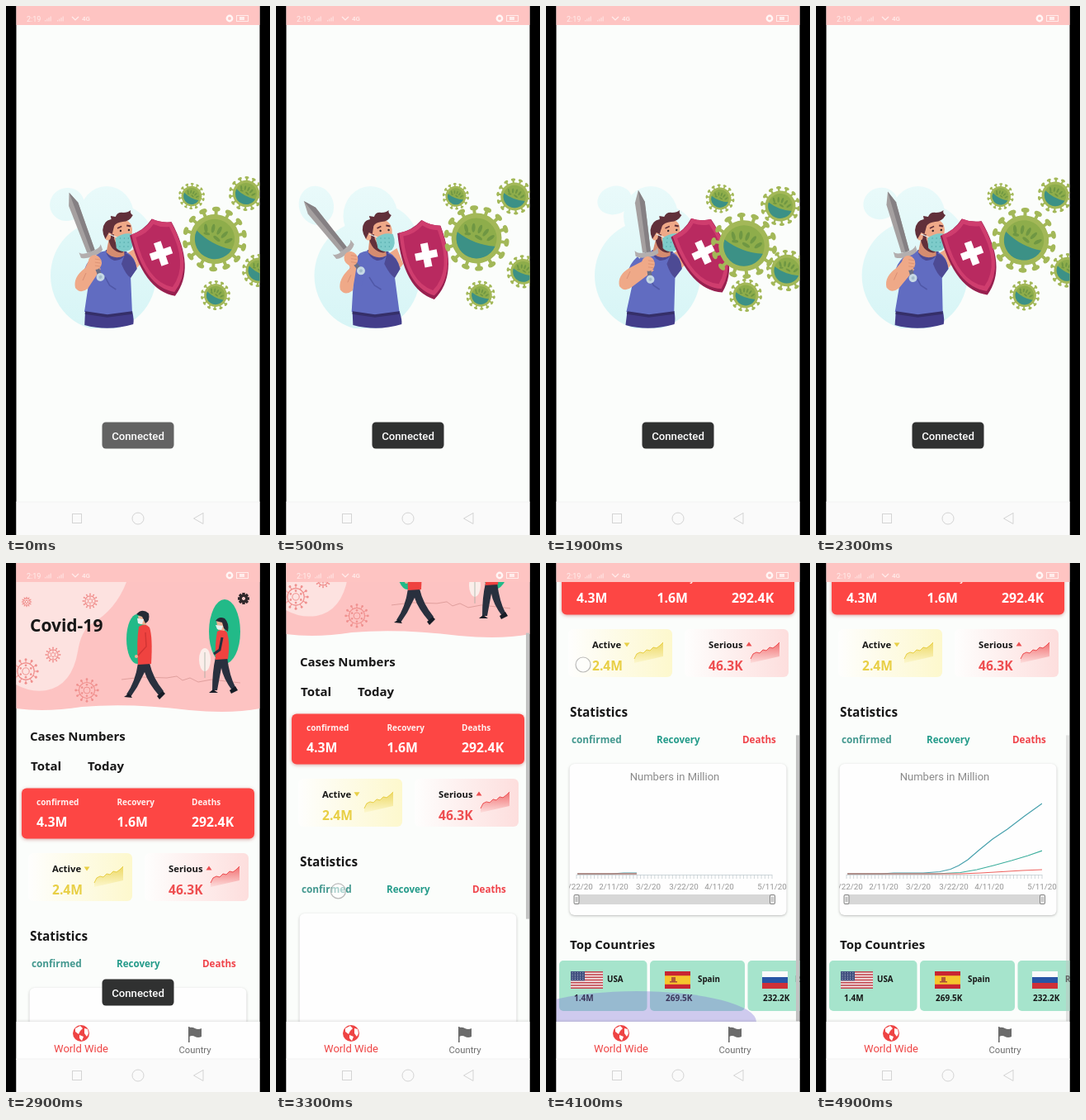
Write an HTML page with a canvas that moves like this. It is 320 px wide and 640 px high and loops after 5 s.

```html
<!DOCTYPE html>
<html lang="en">
<head>
<meta charset="utf-8">
<title>Health app</title>
<style>
html, body { margin: 0; width: 100%; height: 100%; overflow: hidden; background: #000; }
canvas { display: block; width: 320px; height: 640px; }
</style>
</head>
<body>
<canvas id="stage"></canvas>
<script>
const canvas = document.getElementById('stage');
const c = canvas.getContext('2d');
const dpr = window.devicePixelRatio || 1;
canvas.width = 320 * dpr;
canvas.height = 640 * dpr;

const LOOP = 5000, HOME_AT = 2400, MAX_SCROLL = 271;
const HELD = [3, 9, 15, 22, 28, 34, 40, 46];
const SANS = '"Noto Sans", "Open Sans", sans-serif', ROBOTO = 'Roboto, sans-serif';
const RED = '#fd4644', TEAL = '#249b8a', INK = '#171717';
const SKIN = '#efa988', HAIR = '#61303a', SHIRT = '#616cc1', SHIRT_DARK = '#4d4a94', VIRUS = '#a3b858';
const clamp = (v, a = 0, b = 1) => Math.min(b, Math.max(a, v));
const ramp = (t, a, b) => clamp((t - a) / (b - a));
const rad = deg => deg * Math.PI / 180;

// ---- drawing helpers ----
function text(s, x, y, size, color, { weight = 700, font = SANS, align = 'left' } = {}) {
  c.font = `${weight} ${size}px ${font}`;
  c.textAlign = align;
  c.fillStyle = color;
  c.fillText(s, x, y);
}
function rect(x, y, w, h, color) {
  c.fillStyle = color;
  c.fillRect(x, y, w, h);
}
function round(x, y, w, h, r, color) {
  c.beginPath();
  c.roundRect(x, y, w, h, r);
  c.fillStyle = color;
  c.fill();
}
function oval(x, y, rx, ry, color, rot = 0) {
  c.beginPath();
  c.ellipse(x, y, rx, ry, rot, 0, 7);
  c.fillStyle = color;
  c.fill();
}
const dot = (x, y, r, color) => oval(x, y, r, r, color);
function ring(x, y, r, color, w = 1) {
  c.beginPath();
  c.arc(x, y, r, 0, 7);
  c.strokeStyle = color;
  c.lineWidth = w;
  c.stroke();
}
function trace(pts) {
  c.beginPath();
  for (let i = 0; i < pts.length; i += 2) c.lineTo(pts[i], pts[i + 1]);
}
function poly(pts, color) {
  trace(pts);
  c.fillStyle = color;
  c.fill();
}
function line(pts, color, w = 1) {
  trace(pts);
  c.strokeStyle = color;
  c.lineWidth = w;
  c.stroke();
}
function shape(d, color) {
  c.fillStyle = color;
  c.fill(new Path2D(d));
}
function group(x, y, rot, draw) {
  c.save();
  c.translate(x, y);
  c.rotate(rot);
  draw();
  c.restore();
}
function shadowed(blur, dy, color, draw) {
  c.save();
  c.shadowColor = color;
  c.shadowBlur = blur * dpr;
  c.shadowOffsetY = dy * dpr;
  draw();
  c.restore();
}

// ---- splash ----
// Periodic sway through three poses (0, 1100 and 1900 ms of a 2400 ms cycle).
const NODES = [0, 1100, 1900].map(t => t * Math.PI / 2400);
function swayer(t) {
  const a = t * Math.PI / 2400;
  const w = NODES.map((n, i) => NODES.reduce((p, m, j) =>
    j === i ? p : p * Math.sin(a - m) / Math.sin(n - m), 1));
  return (p, q, r) => p * w[0] + q * w[1] + r * w[2];
}

function virus(x, y, r, turn) {
  group(x, y, turn, () => {
    for (let i = 0; i < 14; i++) {
      group(0, 0, (i + .5) * Math.PI / 7, () => {
        rect(r * .7, -r * .05, r * .22, r * .1, VIRUS);
        oval(r * .93, 0, r * .075, r * .125, VIRUS);
      });
    }
    dot(0, 0, r * .77, VIRUS);
    dot(0, 0, r * .62, '#8ead4b');
    c.beginPath();
    c.arc(0, 0, r * .62, .05, Math.PI - .05);
    c.quadraticCurveTo(0, r * .22, r * .62, r * .03);
    c.fillStyle = '#3c9186';
    c.fill();
    for (let i = -2; i <= 2; i++)
      oval(i * r * .2, -r * (.3 - .035 * i * i), r * .055, r * .14, '#6f9743', i * .3);
    oval(r * .05, -r * .04, r * .13, r * .05, '#6f9743', .2);
    oval(-r * .3, -r * .03, r * .1, r * .045, '#6f9743', -.3);
  });
}

function backdrop(s) {
  const x = s(118, 113, 123);
  const tint = c.createLinearGradient(0, 218, 0, 390);
  tint.addColorStop(0, '#e9fafa');
  tint.addColorStop(1, '#d7f5f6');
  c.save();
  c.beginPath();
  c.rect(12, 200, 296, 190);
  c.clip();
  oval(x, 326, 64, 66, tint);
  oval(x + 4, 254, 33, 36, tint);
  oval(x + 15, 290, 48, 50, tint);
  oval(s(74, 48, 83), s(240, 236, 235), 21, s(20, 22, 17), tint, -.3);
  c.restore();
}

function head() {
  shape('M118 284 L137 290 L138 302 Q126 308 116 298Z', '#d58c70');
  shape('M114 268 Q118 258 131 258 Q144 258 146 270 L146 287 Q139 298 128 294 Q117 288 114 268Z', SKIN);
  shape('M117 277 L124 276 Q124 288 137 298 Q130 300 123 293 Q118 287 117 277Z', HAIR);
  oval(117, 279, 3.5, 4.5, SKIN);
  shape('M114 282 Q107 270 113 262 Q115 259 120 258 L119 254 L125 255 Q127 249 134 250 Q140 250 143 247 Q142 251 146 253 Q142 261 134 261 Q126 262 124 266 L122 276 L118 274Z', HAIR);
  line([128, 269, 133, 266.5], HAIR, 1.8);
  line([139, 265.5, 144, 266.5], HAIR, 1.8);
  dot(132, 272, 1.2, '#33242a');
  dot(142, 271, 1.2, '#33242a');
  line([118, 276, 128, 280], '#e6f2f2', 1.3);
  shape('M126 281 Q136 273 147 276 Q151 288 145 295 Q135 300 128 293Z', '#7dcbca');
  for (let i = 0; i < 9; i++)
    dot(132 + i % 3 * 5, 281 + Math.floor(i / 3) * 5, .8, '#53a9aa');
}

function fighter(s) {
  const lean = s(.05, 0, .12), shift = s(1, 0, 2);
  c.save();
  c.transform(1, 0, -lean, 1, shift + 390 * lean, 0);
  shape('M94 369 L151 369 Q154 380 153 385 Q123 394 94 386Z', '#433d8a');
  shape('M137 302 L151 293 L158 312 L148 324Z', SKIN);
  shape('M106 299 Q122 292 141 298 Q151 303 154 318 L147 328 L151 371 Q122 378 93 370 L96 340 Q95 310 106 299Z', SHIRT);
  shape('M139 299 Q151 303 154 318 L147 329 Q141 325 135 312Z', SHIRT_DARK);
  shape('M115 295 L141 297 Q136 309 126 308 Q117 305 115 295Z', SHIRT_DARK);
  line([94, 371, 121, 375, 151, 371], '#352f69', 3.5);
  line([116, 328, 122, 338, 130, 343], '#5058a8', 1.5);
  head();
  c.restore();
}

function sword(s) {
  const x = s(103, 95, 122), y = s(297, 295, 298), turn = rad(s(-20.4, -33, -7.7));
  const hx = x - Math.sin(turn) * 14, hy = y + Math.cos(turn) * 14;
  const ex = s(87, 84, 92), ey = s(338, 339, 336);
  const sx = s(103, 100, 109);
  shape(`M${sx + 2} 303 Q${ex + 8} 313 ${ex + 7} 324 L${sx + 7} 340 L${sx + 14} 318Z`, SHIRT);
  shape(`M${ex + 9} 317 Q${ex - 6} ${ey - 10} ${ex - 3} ${ey + 3} Q${ex + 3} ${ey + 11} ${ex + 12} ${ey + 4}`
    + ` L${hx + 7} ${hy + 8} L${hx - 7} ${hy - 3}Z`, SKIN);
  line([ex + 10, ey - 15, ex + 6, ey - 6], '#d98f74', 1);
  group(x, y, turn, () => {
    poly([0, -76, -6, -61, -5, 0, 5, 0, 6, -61], '#a5a0a0');
    poly([0, -76, 0, 0, 5, 0, 6, -61], '#858083');
    rect(-2.5, 0, 5, 30, '#6b6f86');
    shape('M-14 -4 Q-11 1 0 0 Q11 1 14 -4 L14 3 Q8 7 0 6 Q-8 7 -14 3Z', '#b3aeae');
    dot(0, 33, 5, '#c6d9e5');
    dot(0, 33, 2, '#a3bccc');
  });
  oval(hx, hy, 8, 9, SKIN, turn);
  for (let i = 0; i < 3; i++)
    line([hx, hy - 4 + i * 4, hx + 7, hy - 3 + i * 4], '#d88e70', .8);
}

function shield(s) {
  group(s(187, 182, 191), s(304, 305, 302), rad(s(-21, -17, -27)), () => {
    const outline = 'M-25 -38 Q-7 -37 7 -47 Q16 -38 28 -35 Q36 28 0 50 Q-34 30 -25 -38Z';
    shape(outline, '#98204f');
    c.save();
    c.translate(1, -2);
    c.scale(.95, .95);
    shape(outline, '#cf3d6e');
    c.scale(.84, .86);
    shape(outline, '#b92a60');
    c.restore();
  });
  group(s(188, 182.5, 190.5), s(299.5, 300.5, 298), rad(s(-19, -15, -25)), () => {
    rect(-4.5, -14.5, 9, 29, '#fff');
    rect(-13.5, -4.5, 27, 9, '#fff');
  });
}

function splash(t) {
  const s = swayer(t);
  backdrop(s);
  fighter(s);
  sword(s);
  shield(s);
  const turn = s(.5, .14, .36);
  virus(s(225, 198, 211), s(230, 234, 233), s(16, 18, 17.5), turn);
  virus(s(291, 280, 284), s(227, 250, 242), s(21, 26, 24), turn);
  virus(s(306, 280, 292), s(320, 322, 320), s(20, 26, 25), turn);
  virus(s(253, 223, 240), s(282, 290, 290), s(39, 41, 40), turn);
  virus(s(254, 231, 242), s(350, 350, 350), s(18, 20, 20), turn);
}

// ---- home ----
function germ(x, y, r) {
  const color = '#f0908e';
  ring(x, y, r * .68, color, 1.2);
  ring(x, y, r * .28, color, 1);
  for (let i = 0; i < 12; i++) group(x, y, i * Math.PI / 6, () => {
    line([r * .68, 0, r * .95, 0], color, 1);
    dot(r * .95, 0, r * .1, color);
    if (i % 2) dot(r * .48, 0, r * .09, color);
  });
}

function walkers() {
  line([140, 141, 165, 138, 195, 139, 207, 137, 214, 142, 223, 139, 233, 144, 249, 141, 284, 145], '#d99694', .8);
  oval(159, 92, 13, 30, '#22ba88');
  oval(265, 83, 19, 39, '#22ba88');
  oval(241, 117, 7, 14, '#fbeeea');
  line([241, 108, 241, 139], '#9aa69c', .7);
  // left walker
  shape('M160 121 L174 121 Q178 139 191 155 L186 161 Q172 145 168 132 L159 150 L151 162 L146 159 Q157 143 160 121Z', '#29303e');
  shape('M143 162 L149 158 L153 163Z M183 161 L190 155 L193 158 L186 165Z', '#171c26');
  shape('M161 77 Q169 72 174 78 Q178 90 176 122 L160 123 Q158 95 161 77Z', '#ef4340');
  line([169, 84, 170, 101, 160, 112], '#d23434', 1.5);
  dot(158, 113, 2, '#efb193');
  shape('M160 64 L170 65 L170 75 L162 74Z', '#efb193');
  shape('M158 62 Q165 54 173 61 Q175 70 169 73 L165 65Z', '#252b36');
  shape('M159 67 L167 68 L165 74 L160 73Z', '#e8f1f1');
  // right walker
  shape('M254 114 L268 114 Q271 137 278 150 L274 154 Q263 139 261 127 L256 154 L250 154 Q250 131 254 114Z', '#29303e');
  shape('M246 157 L251 153 L257 157Z M271 154 L278 149 L281 154 L273 158Z', '#171c26');
  shape('M256 83 Q263 78 268 84 Q272 98 269 116 L254 117 Q253 98 256 83Z', '#ef4340');
  line([262, 90, 259, 105, 252, 110], '#29303e', 3);
  shape('M255 70 L264 70 L265 82 L257 81Z', '#efb193');
  shape('M254 70 Q258 64 265 67 Q271 73 269 83 L264 79 L262 72Z', '#252b36');
  shape('M254 75 L263 76 L261 81 L256 80Z', '#e8f1f1');
}

function header() {
  shape('M12 0 H308 V176 Q272 183 222 178 Q150 169 92 174 Q48 181 12 176Z', '#fdc3c2');
  shape('M12 23 H146 Q133 57 103 74 Q91 82 87 107 Q80 148 49 154 Q30 157 12 147Z', '#fde2e0');
  germ(25, 47, 6);
  germ(102, 46, 9);
  germ(57, 111, 9);
  germ(24, 131, 15);
  germ(98, 154, 14);
  walkers();
  text('Covid-19', 29, 83, 21, INK);
  for (let i = 0; i < 8; i++)
    group(288, 43, i * Math.PI / 4, () => rect(-1.7, -7, 3.4, 5, '#30282b'));
  ring(288, 43, 3.8, '#30282b', 2.8);
}

function trendCard(x, name, value, color, tint, up) {
  const g = c.createLinearGradient(x, 0, x + 126, 0);
  g.addColorStop(0, '#fefefd');
  g.addColorStop(1, tint);
  round(x, 351, 126, 58, 6, g);
  text(name, x + 29, 374, 11.3, INK);
  text(value, x + 29, 401, 15.6, color);
  const tx = up ? x + 78 : x + 71, d = up ? -3 : 3;
  poly([tx - 3.5, 369.5 - d * .7, tx + 3.5, 369.5 - d * .7, tx, 369.5 + d], color);
  const pts = [0, 387, 3, 381, 7, 379, 11, 380, 15, 376, 19, 377, 23, 373, 27, 374, 31, 371, 35, 367]
    .map((v, i) => i % 2 ? v : v + x + 80);
  const fade = c.createLinearGradient(0, 368, 0, 393);
  fade.addColorStop(0, color);
  fade.addColorStop(1, tint);
  c.globalAlpha = .75;
  poly([...pts, x + 115, 384, x + 80, 392], fade);
  c.globalAlpha = 1;
  line(pts, color, 1);
}

function series(pts, color) {
  c.beginPath();
  c.moveTo(38, 647);
  for (let i = 0; i < pts.length; i += 2) c.lineTo(pts[i], pts[i + 1]);
  c.strokeStyle = color;
  c.lineWidth = 1.2;
  c.stroke();
}

function chart(t) {
  shadowed(3, 1, 'rgba(0,0,0,.25)', () => round(28.5, 514, 263, 183, 6, '#fefefe'));
  if (t < 3900) return;
  const label = { weight: 400, font: ROBOTO, align: 'center' };
  c.save();
  c.beginPath();
  c.rect(28, 514, 264, 183);
  c.clip();
  text('Numbers in Million', 156, 534, 13, '#8a8a8a', label);
  line([37, 648.5, 274, 648.5], '#cfd8dc');
  for (let i = 0; i <= 55; i++) {
    const x = 37 + i * 237 / 55;
    line([x, 648, x, 653], '#c5cdd1', .8);
  }
  [['1/22/20', 39], ['2/11/20', 82], ['3/2/20', 124], ['3/22/20', 167], ['4/11/20', 210], ['5/11/20', 274]]
    .forEach(([s, x]) => text(s, x, 666, 9.8, '#969696', label));
  rect(37, 672, 238, 12, '#d7d7d7');
  for (const x of [37, 274.5]) {
    round(x - 3.5, 672, 7, 12, 2, '#858585');
    round(x - 2.5, 673, 5, 10, 1, '#eee');
    line([x - .8, 675, x - .8, 681], '#888', .6);
    line([x + .8, 675, x + .8, 681], '#888', .6);
  }
  c.beginPath();
  c.rect(38, 520, 236 * clamp(.305 + (t - 4100) / 720), 130);
  c.clip();
  series([80, 647, 94, 646, 130, 646, 150, 644.5, 163, 641.5, 173, 637, 184, 630, 198, 618, 214, 605, 232, 593, 253, 577, 274, 562], '#48a1ad');
  series([145, 647, 175, 645.5, 195, 642, 215, 637, 237, 631, 257, 625, 274, 619], '#3cae9d');
  series([175, 647, 200, 646, 225, 644.5, 250, 643, 274, 642], '#ee625e');
  c.restore();
}

function usaFlag(x, y) {
  rect(x, y, 39, 21, '#f5eeee');
  for (let i = 0; i < 7; i++) rect(x, y + i * 3.23, 39, 1.62, '#c2474f');
  rect(x, y, 17, 11.3, '#40507f');
  for (let i = 0; i < 20; i++)
    dot(x + 2 + i % 5 * 3.2, y + 1.8 + Math.floor(i / 5) * 2.6, .5, '#e4e6ee');
}
function spainFlag(x, y) {
  rect(x, y, 31, 21, '#c92532');
  rect(x, y + 5.25, 31, 10.5, '#f6c52d');
  rect(x + 8, y + 7, 5, 6, '#b35a35');
  rect(x + 6, y + 12, 9, 1.5, '#a94c36');
}
function russiaFlag(x, y) {
  rect(x, y, 31, 7, '#fafafa');
  rect(x, y + 7, 31, 7, '#2855a5');
  rect(x, y + 14, 31, 7, '#cf3037');
}
function countryCard(x, w, flag, flagX, name, nameX, value, valueX) {
  round(x, 752, w, 61, 5, '#a6e4cc');
  flag(flagX, 765);
  text(name, nameX, 778, 9.8, INK);
  text(value, valueX, 801, 10, INK);
}

function page(t) {
  header();
  text('Cases Numbers', 29, 215, 15, INK);
  text('Total', 30, 251, 15, INK);
  text('Today', 99, 251, 15, INK);
  shadowed(4, 1, 'rgba(150,0,0,.35)', () => round(19, 272.5, 282, 61, 6, RED));
  [['confirmed', '4.3M', 37], ['Recovery', '1.6M', 134.5], ['Deaths', '292.4K', 225]].forEach(([k, v, x]) => {
    text(k, x, 293, 10, '#fff0ef');
    text(v, x, 319, 15.8, '#fff');
  });
  trendCard(27, 'Active', '2.4M', '#e8cf45', '#fdf8cd', false);
  trendCard(168, 'Serious', '46.3K', '#ee4e50', '#fddedd', true);
  text('Statistics', 29, 457, 15.3, INK);
  text('confirmed', 31, 489, 11.8, '#43988f');
  text('Recovery', 134, 489, 11.6, TEAL);
  text('Deaths', 238, 489, 11.6, '#f0444b');
  chart(t);
  text('Top Countries', 29, 738, 15, INK);
  countryCard(16, 106.5, usaFlag, 30, 'USA', 74, '1.4M', 34);
  countryCard(126, 115, spainFlag, 144, 'Spain', 184, '269.5K', 145);
  countryCard(244.5, 106, russiaFlag, 262, 'Russia', 302, '232.2K', 263);
}

function tabs() {
  shadowed(3, -1, 'rgba(0,0,0,.12)', () => rect(12, 555, 296, 46, '#fefefe'));
  dot(91, 569, 10, '#ee4444');
  shape('M84 563 L90 560 L93 563 L90 566 L88 570 L84 567Z M89 571 L94 573 L92 578 L89 575Z M95 563 L99 564 L100 569 L98 573 L95 569Z', '#fff');
  const opts = { weight: 400, font: ROBOTO, align: 'center' };
  text('World Wide', 91, 592, 13, '#ee4545', opts);
  rect(221, 561, 1.6, 19, '#6b6b6b');
  shape('M222 562 Q226 561 229 563 Q233 565 237 563 V573 Q233 575 229 573 Q226 571 222 573Z', '#6b6b6b');
  text('Country', 229, 593, 11.3, '#6f6f6f', opts);
}

function home(t) {
  const u = Math.max(0, (t - 3100) / 500);
  const finger = 487 - 236 * u + 27 * u * u;
  const scroll = t > 4000 ? MAX_SCROLL : clamp(487 - finger, 0, MAX_SCROLL);
  c.save();
  c.beginPath();
  c.rect(12, 0, 296, 555);
  c.clip();
  c.translate(0, -scroll);
  page(t);
  c.restore();

  const glow = ramp(t, 3700, 4000) * (1 - ramp(t, 4150, 4500));
  if (glow) {
    c.save();
    c.beginPath();
    c.rect(12, 500, 296, 55);
    c.clip();
    oval(110, 555, 145, 37 * glow, `rgba(124,112,214,${.36 * glow})`);
    c.restore();
  }
  if (scroll) {
    c.globalAlpha = 1 - .55 * ramp(t, 4600, 4900);
    rect(303, 23 + scroll * .684, 4, 346, '#c3c3c3');
    c.globalAlpha = 1;
  }
  tabs();
  if (t >= 3100 && t < 4250) {
    const x = 64 - 19 * (u - 1), y = Math.max(finger, 115);
    dot(x, y, 9, 'rgba(255,255,255,.55)');
    ring(x, y, 9, 'rgba(150,150,150,.65)', 1.2);
  }
}

// ---- system chrome ----
function statusBar() {
  rect(12, 0, 296, 23, '#fec4c2');
  const pale = 'rgba(255,244,243,.85)';
  text('2:19', 25, 18.5, 9, pale, { weight: 400, font: ROBOTO });
  for (const x of [47, 62]) {
    for (let i = 0; i < 4; i++) rect(x + i * 2.2, 17 - i * 1.5, 1.2, 1.5 + i * 1.5, 'rgba(255,244,243,.6)');
  }
  line([80, 13, 84, 17, 88, 13], pale, 1.2);
  text('4G', 92, 18, 8, pale, { weight: 500, font: ROBOTO });
  ring(271, 15, 3.2, '#fff6f5', 2.4);
  c.strokeStyle = pale;
  c.lineWidth = 1;
  c.strokeRect(279.5, 11.5, 14, 7);
  rect(283, 13, 6, 4, pale);
}
function navBar() {
  rect(12, 600, 296, 40, '#fafafa');
  rect(12, 599.5, 296, 1, '#f3f3f3');
  c.strokeStyle = '#d4d4d4';
  c.lineWidth = 1;
  c.strokeRect(80.5, 614.5, 11, 11);
  ring(160, 620, 7, '#d4d4d4');
  line([239, 613.5, 227.5, 620, 239, 626.5, 239, 613], '#d4d4d4');
}
function toast(t) {
  const out = 1 - ramp(t, 2900, 3200);
  if (!out) return;
  c.globalAlpha = out * Math.min(.75 + t / 400, 1);
  round(116.5, 503.5, 87, 32, 4.5, '#303131');
  c.globalAlpha = out;
  text('Connected', 160, 524.5, 13.2, '#fff', { weight: 500, font: ROBOTO, align: 'center' });
  c.globalAlpha = 1;
}

function draw(t) {
  c.setTransform(dpr, 0, 0, dpr, 0, 0);
  rect(0, 0, 320, 640, '#000');
  c.save();
  c.beginPath();
  c.rect(12.5, 0, 295, 640);
  c.clip();
  rect(12, 0, 296, 640, '#fbfdfb');
  if (t < HOME_AT) splash(t);
  else home(t);
  statusBar();
  navBar();
  toast(t);
  c.restore();
}

// The picture steps every 100 ms, with a few steps held twice as long.
const start = performance.now();
function tick() {
  let step = Math.floor((performance.now() - start) % LOOP / 100);
  if (HELD.includes(step)) step--;
  draw(step * 100);
  requestAnimationFrame(tick);
}
tick();
</script>
</body>
</html>
```
